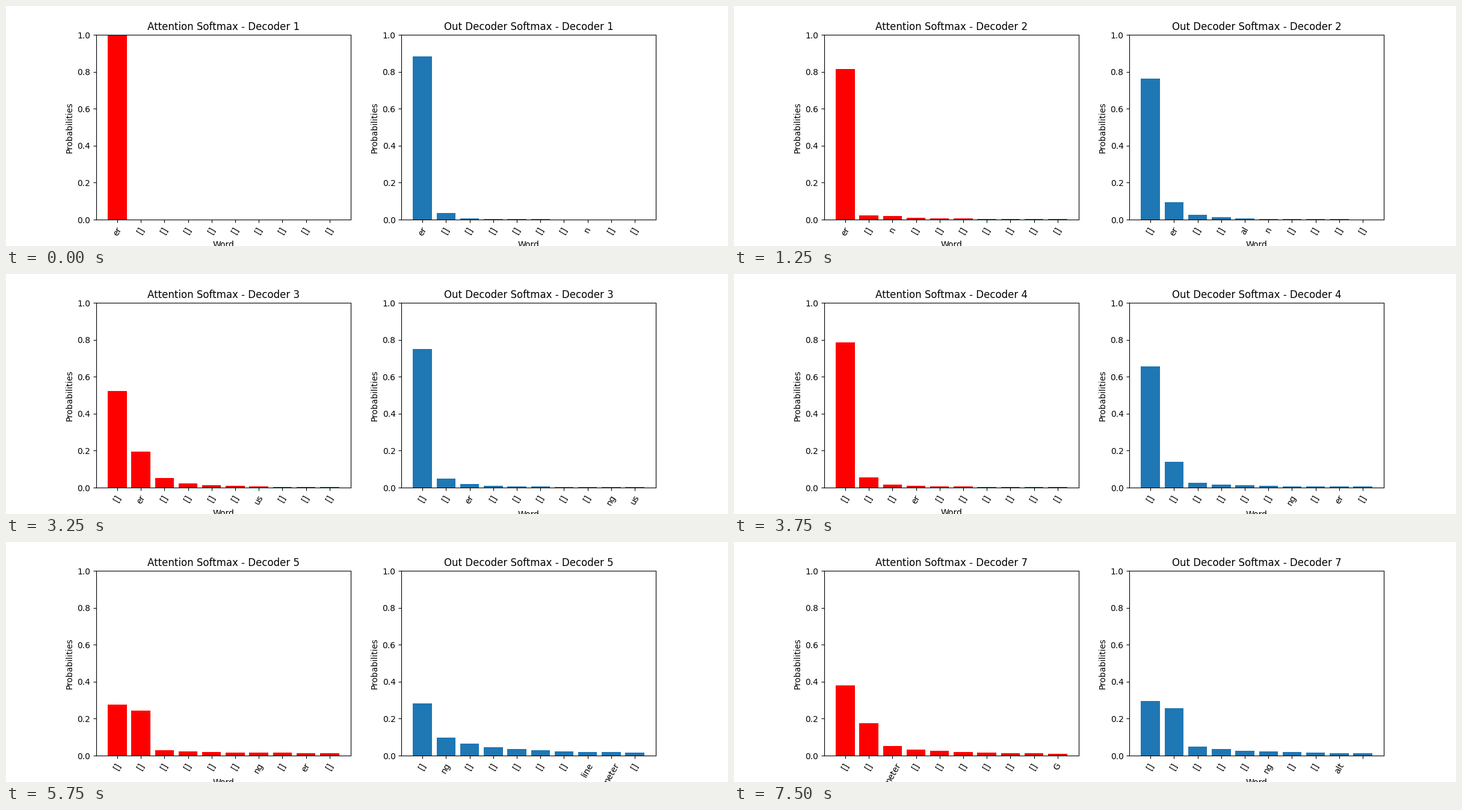
A matplotlib script that plays this animation: 1200 by 400 pixels, repeating every 8000 ms.

```python
import matplotlib.pyplot as plt
import numpy as np
from matplotlib.animation import FuncAnimation

BARS = 10
INTERVAL = 250       # ms per tick
TICKS_PER_STEP = 5   # each decoder step stays for 1250 ms
TICKS = 32

# Per decoder step: first, second and third probability, decay of the tail,
# and the words that are not empty brackets, by bar position.
ATTENTION = [
    (1, 0, 0, 1, {0: "er"}),
    (.815, .022, .018, 1.2, {0: "er", 2: "n"}),
    (.523, .195, .052, 1.9, {1: "er", 6: "us"}),
    (.786, .055, .017, 1.3, {3: "er"}),
    (.276, .244, .028, .5, {6: "ng", 8: "er"}),
    (.318, .062, .042, .75, {2: "meter", 3: "ng"}),
    (.380, .175, .051, 1, {2: "meter", 9: "G"}),
]
OUTPUT = [
    (.883, .036, .006, 1.4, {0: "er", 7: "n"}),
    (.763, .094, .026, 1.9, {1: "er", 4: "al", 5: "n"}),
    (.750, .049, .019, 1.3, {2: "er", 8: "ng", 9: "us"}),
    (.656, .140, .026, 1.1, {6: "ng", 8: "er"}),
    (.283, .098, .064, .9, {1: "ng", 7: "line", 8: "meter"}),
    (.448, .107, .052, 1.1, {5: "meter", 6: "ng", 8: "line"}),
    (.295, .256, .050, .9, {5: "ng", 8: "alt", 9: ""}),
]

fig, (left, right) = plt.subplots(1, 2, figsize=(12, 4), dpi=100)
PANELS = [
    (left, "Attention Softmax", ATTENTION, "red"),
    (right, "Out Decoder Softmax", OUTPUT, "tab:blue"),
]


def ranked(first, second, third, decay):
    """Two leading probabilities, then a power-law tail."""
    rank = np.arange(2, BARS)
    return [first, second, *(third * (2 / rank) ** decay)]


def draw_panel(ax, title, steps, color, step):
    *shape, words = steps[step]
    ax.clear()
    ax.bar(range(BARS), ranked(*shape), color=color)
    ax.set_xticks(range(BARS), [words.get(i, "[]") for i in range(BARS)],
                  rotation=60)
    ax.set_ylim(0, 1)
    ax.set_title(f"{title} - Decoder {step + 1}")
    ax.set_xlabel("Word")
    ax.set_ylabel("Probabilities")


def update(tick):
    for panel in PANELS:
        draw_panel(*panel, tick // TICKS_PER_STEP)
    return []


anim = FuncAnimation(fig, update, frames=TICKS, interval=INTERVAL,
                     init_func=lambda: update(0), repeat=True, repeat_delay=0)
plt.show()
```
